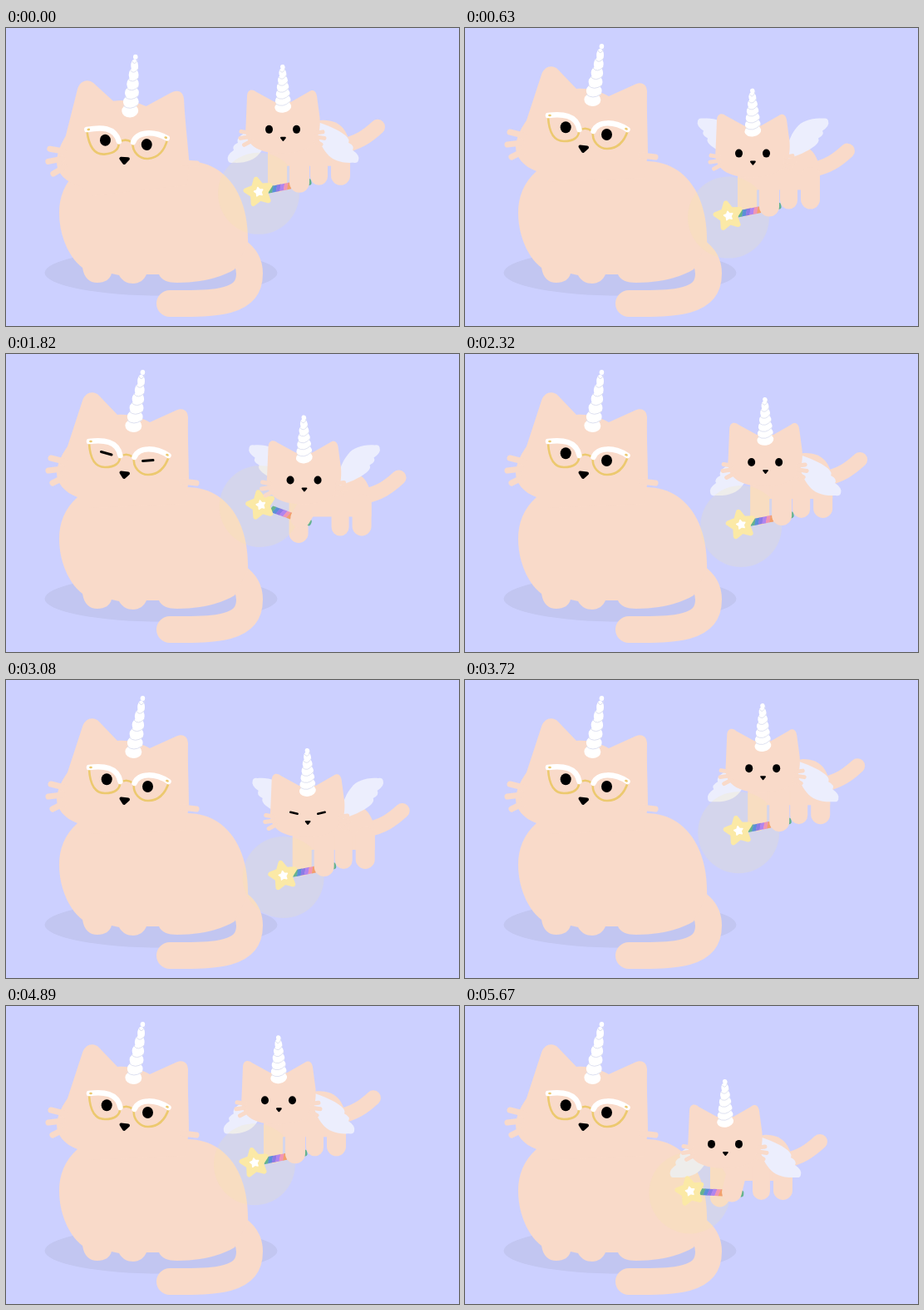
Write an HTML page that moves like this. It is 545x358 px and loops after 5.77 s.

```html
<!DOCTYPE html>
<html lang="en">
<head>
<meta charset="utf-8">
<title>Unicorn cats</title>
<style>
  html, body { margin: 0; width: 100%; height: 100%; overflow: hidden; background: #ccd0ff; }
  svg { display: block; width: 100vw; height: 100vh; }
  .fur { fill: #f9dac9; }
  .furLine { fill: none; stroke: #f9dac9; stroke-linecap: round; }
  .ink { fill: #000; }
  .lid { fill: none; stroke: #000; stroke-linecap: round; }
  .gold { fill: none; stroke: #ecc96f; stroke-width: 2.6; stroke-linecap: round; }
  .brow { fill: none; stroke: #fff; stroke-width: 6.5; stroke-linecap: round; }
  .wing { fill: #eceefd; }
</style>
</head>
<body>
<svg viewBox="0 0 545 358">
  <defs>
    <path id="wingShape" d="M374 113 C387 117 399 122 408 129 Q414 134 412 138 Q420 142 417 147 Q426 153 424 159 Q423 163 418 162 C404 163 392 159 386 151 C380 144 377 136 374 126Z"/>
  </defs>
  <rect width="545" height="358" fill="#ccd0ff"/>
  <ellipse cx="186.5" cy="294" rx="140" ry="27.5" fill="#c2c6f1"/>

  <g id="bigCat">
    <path class="furLine" stroke-width="32" d="M197 331 C250 331 293 332 293 295 C293 281 286 272 274 265"/>
    <path class="fur" d="M86 172 C70 186 64 204 64 222 C64 250 76 276 92 288 C94 300 100 306 110 306 C119 306 125 302 127 295 L136 297 C140 304 146 307 153 307 C160 307 166 303 169 296 L184 296 C187 303 195 306 206 306 C235 306 258 300 275 290 L291 260 C293 203 266 160 218 160 L150 150Z"/>
    <g id="bigHead">
      <path class="fur" d="M86 172 C70 166 61 155 61 143 C62 128 70 117 74 111 L92 56 C96 45 106 44 112 50 L134 73 C148 72 160 75 173 82 L204 68 C212 64 218.500 67 219 76 C218.500 105 220 130 220 150 L216 180 L100 185Z"/>
      <path class="furLine" stroke-width="7" d="M54 125 L70 129 M51 140 L68 138 M56 155 L70 148 M229 155 L212 153"/>
      <g id="bigHorn" transform="translate(152 94) rotate(9.800)"></g>
      <path class="gold" d="M100 107 C101 125 107 136 119 136 C131 136 138 131 137 122 M154 124 C152 137 162 145 171 145 C184 145 192 135 196 123 M138 123 Q145 118 153 124"/>
      <path class="brow" d="M100 105 C117 103 134 104 137.500 122 M154.500 124 C160 111 180 112 195.500 122"/>
      <path class="gold" d="M101.500 105 h1 M193.500 121 l1 .4"/>
      <g id="bigEyes" class="ink">
        <ellipse cx="121.200" cy="119.200" rx="6.500" ry="7"/>
        <ellipse cx="170.500" cy="128" rx="6.500" ry="7"/>
      </g>
      <path id="bigLids" class="lid" stroke-width="3" d="M114.500 117.500 L127 121 M164.500 128.500 L177 127.500"/>
      <path class="ink" stroke="#000" stroke-width="4" stroke-linejoin="round" d="M138.500 142.500 L147 143.500 L142 148Z"/>
    </g>
  </g>

  <g id="kitten">
    <g transform="matrix(-1 0 0 1 691 0)"><use href="#wingShape" class="wing flap"/></g>
    <path class="furLine" stroke-width="18" d="M403 142 C424 138 435 130 447 119"/>
    <path class="fur" d="M318 120 L380 111 C402 110 414 124 414 150 L414 166 L318 166Z"/>
    <path class="furLine" stroke-width="23" d="M402.500 150 V177.500 M326.500 150 V186"/>
    <path class="furLine" stroke-width="21" d="M376.500 150 V178.500"/>
    <g id="arm">
      <circle cx="304" cy="199" r="49" fill="#f6e4a0" opacity=".2"/>
      <g transform="translate(304 197)">
        <g id="stick" transform="rotate(-11)"></g>
        <g id="starTurn">
          <path id="star" fill="#fbe9a6" stroke="#fbe9a6" stroke-width="6" stroke-linejoin="round"/>
          <path id="starCore" fill="#fff" stroke="#fff" stroke-width="1.500" stroke-linejoin="round"/>
        </g>
      </g>
      <path class="furLine" stroke-width="24" d="M353 150 V186"/>
    </g>
    <use href="#wingShape" class="wing flap"/>
    <path class="fur" d="M288.500 118 L290 82 C290.500 74 296 73 301 77 L323 89 H343 L364 77 C369 73 373 76 374 82 L377.500 108 C379 132 372 150 333 151 C302 151 286 140 288.500 118Z"/>
    <path class="furLine" stroke-width="5" d="M283 124.500 L292 126 M282 132.500 L292 131 M286.500 140.500 L295 136 M381 125 L373 126 M383 132.500 L373 131 M379 140 L372 136"/>
    <g id="smallHorn" transform="translate(333.300 103) rotate(-.5)"></g>
    <g id="smallEyes" class="ink">
      <ellipse cx="316.500" cy="122" rx="4.500" ry="5"/>
      <ellipse cx="349.500" cy="122" rx="4.500" ry="5"/>
    </g>
    <path id="smallLids" class="lid" stroke-width="2.500" d="M312.500 120.700 L321 122.700 M345.500 122.700 L354 120.700"/>
    <path class="ink" stroke="#000" stroke-width="2" stroke-linejoin="round" d="M331 132 H335.800 L333.400 135Z"/>
  </g>
</svg>
<script>
const LOOP = 5770;
const el = id => document.getElementById(id);
const flaps = document.querySelectorAll('.flap');

// Tapered horn of overlapping rings, base at the origin
function buildHorn(group, length) {
  const rings = 6, step = (length - 11) / rings;
  let shapes = '', lines = '';
  for (let i = 0; i <= rings; i++) {
    const y = -8 - i * step, w = 2.8 + 7.2 * (1 - (i / rings) ** 1.4);
    const ry = i < rings ? Math.min(8, step * 0.85) : 3;
    shapes += `<ellipse cy="${y}" rx="${w}" ry="${ry}" transform="rotate(-8 0 ${y})"/>`;
    if (i < rings) {
      const ly = y - step * 0.5;
      lines += `M${-w + 1} ${ly} Q0 ${ly + 6} ${w - 1} ${ly - 3}`;
    }
  }
  group.innerHTML = `<g fill="#fff">${shapes}</g>` +
    `<path d="${lines}" fill="none" stroke="#dcdff0" stroke-width=".9"/>`;
}

function starPath(outer, inner) {
  let d = '';
  for (let i = 0; i < 10; i++) {
    const r = i % 2 ? inner : outer, a = (i / 5 - 0.5) * Math.PI;
    d += `${i ? 'L' : 'M'}${r * Math.cos(a)} ${r * Math.sin(a)}`;
  }
  return d + 'Z';
}

function buildStick() {
  const colors = ['#65b38f', '#5b8fd8', '#8b7be6', '#b184ee', '#f095b4', '#f2a06c'];
  const stripes = colors.map((color, i) =>
    `<path d="M${11 + i * 4.6} 4 l3 -8 h5 l-3 8Z" fill="${color}"/>`);
  el('stick').innerHTML = `<rect x="42" y="-4" width="22.5" height="8" rx="3" fill="${colors[0]}"/>` + stripes.join('');
}

function track(keys, t) {
  let i = 1;
  while (i < keys.length - 1 && t > keys[i][0]) i++;
  const [t0, a] = keys[i - 1], [t1, b] = keys[i];
  return a + (b - a) * (t - t0) / (t1 - t0);
}

const drift = [[0, 333], [630, 346], [1250, 353.5], [1870, 359], [2500, 362], [3080, 362.7],
  [3690, 359], [4310, 343], [4890, 328], [5500, 317], [5670, 313], [5770, 311]];
const bobPhase = [[0, 292], [1250, 667], [2320, 997], [3080, 1224], [4310, 1582],
  [4890, 1750], [5670, 1984], [5770, 2014]];
const waves = [1760, 4125, 5460];
const bigBlinks = [[1750, 1920], [2890, 3070], [4130, 4300]];
const smallBlinks = [[1150, 1310], [3020, 3190]];

const within = (spans, t) => spans.some(([a, b]) => t >= a && t < b);
const smooth = u => { u = Math.min(1, Math.max(0, u)); return u * u * (3 - 2 * u); };

function setBlink(name, closed) {
  el(name + 'Eyes').style.display = closed ? 'none' : '';
  el(name + 'Lids').style.display = closed ? '' : 'none';
}

function draw(t) {
  const low = 1 - smooth((t - 30) / 560);
  el('bigHead').setAttribute('transform', `translate(0 ${14 * low}) rotate(${-4 * low} 142 145)`);

  const phase = track(bobPhase, t);
  const y = 56 - 32 * Math.cos(phase * Math.PI / 180);
  el('kitten').setAttribute('transform', `translate(${track(drift, t) - 333} ${y - 44})`);

  const wingsUp = (phase + 15) % 360 < 180;
  flaps.forEach(w => w.setAttribute('transform', wingsUp ? 'matrix(1 0 0 -1 0 242)' : ''));

  let lift = 0;
  for (const center of waves) {
    const u = Math.abs(t - center) / 380;
    if (u < 1) lift = 33 * Math.cos(u * Math.PI / 2) ** 2;
  }
  el('arm').setAttribute('transform', `rotate(${lift} 374 133)`);
  el('starTurn').setAttribute('transform', `rotate(${-12 - lift})`);

  setBlink('big', within(bigBlinks, t));
  setBlink('small', within(smallBlinks, t));
}

buildHorn(el('bigHorn'), 76);
buildHorn(el('smallHorn'), 59);
buildStick();
el('star').setAttribute('d', starPath(15.5, 8));
el('starCore').setAttribute('d', starPath(5.5, 3));

const start = performance.now();
function tick() {
  draw((performance.now() - start) % LOOP);
  requestAnimationFrame(tick);
}
tick();
</script>
</body>
</html>
```
